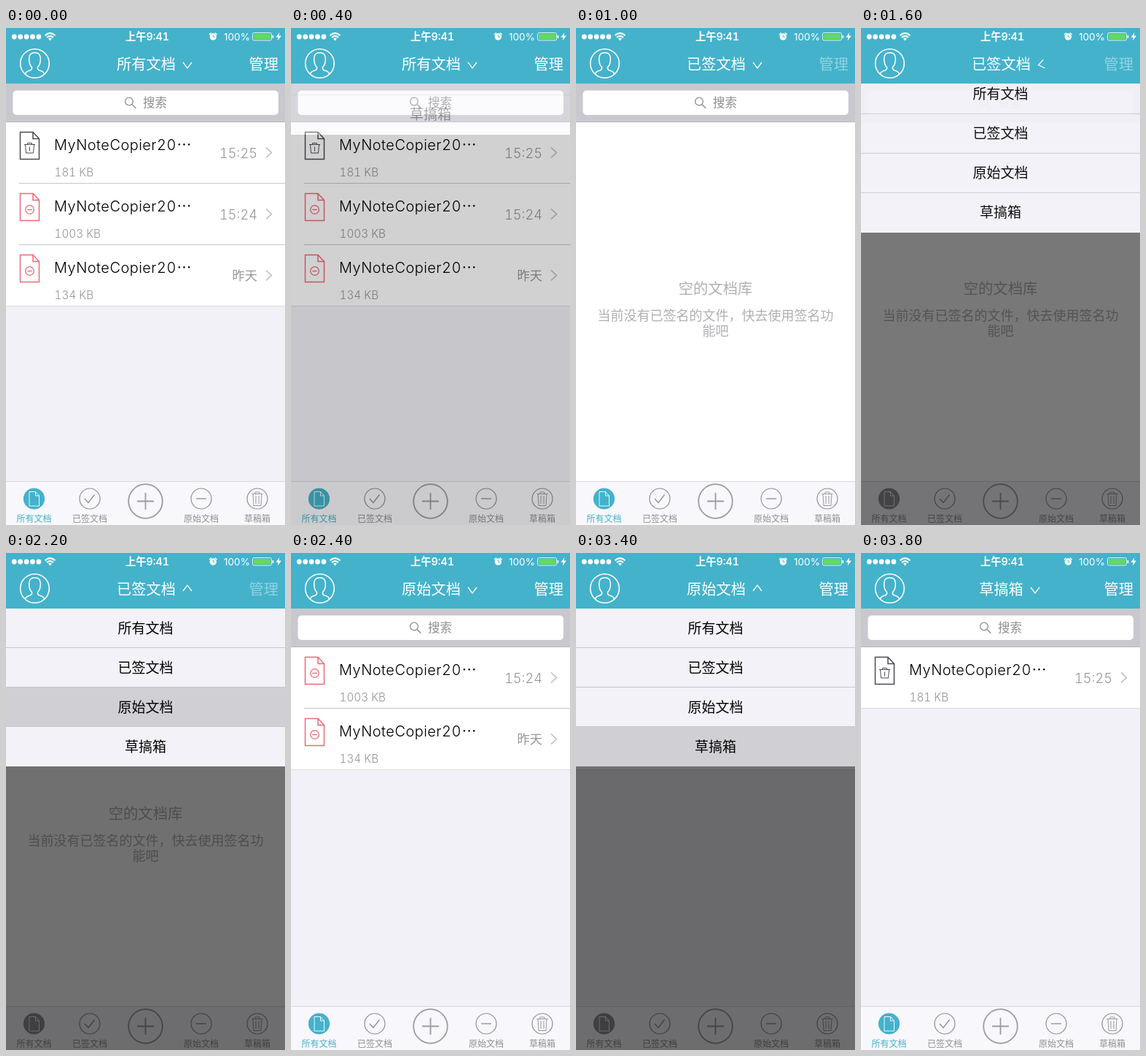
Animation of 383 by 680 pixels, one loop 4000 ms. Source, as an HTML page:

```html
<!DOCTYPE html>
<html lang="zh-CN">
<head>
<meta charset="utf-8">
<style>
html, body { margin: 0; width: 100%; height: 100%; overflow: hidden; background: #f2f1f7; }
svg { display: block; width: 383px; height: 680px; }
text { font-family: Inter, "Noto Sans CJK SC", "Noto Sans CJK JP", sans-serif; font-variant-numeric: tabular-nums; }
</style>
</head>
<body>
<svg id="stage" viewBox="0 0 383 680"></svg>
<script>
const BLUE = '#44b2cb', GRAY = '#8f8f94', LINE = '#c8c7cc', RED = '#ed6a76', DARK = '#4b4b52';
const LIGHT = 'font-weight="300"';
const TITLES = ['所有文档', '已签文档', '原始文档', '草搞箱'];
const FILES = [
  { size: '181 KB', time: '15:25', draft: true },
  { size: '1003 KB', time: '15:24' },
  { size: '134 KB', time: '昨天' }
];
const VIEWS = [FILES, [], FILES.slice(1), FILES.slice(0, 1)];
const BAR = 76, ROW = 54, MENU = 4 * ROW, LOOP = 4000;

// start, view, menu openness, arrow turn, picked menu row
const STEPS = [
  [0, 0, 0, 0], [400, 0, .324, 0], [600, 0, 1, 180],
  [1000, 1, 0, 0], [1600, 1, .944, 80], [1800, 1, 1, 180], [2200, 1, 1, 180, 2],
  [2400, 2, 0, 0], [2800, 2, .95, 80], [3000, 2, 1, 180], [3200, 2, 1, 180, 3],
  [3600, 3, 0, 0]
];

const rect = (x, y, w, h, fill, more = '') =>
  `<rect x="${x}" y="${y}" width="${w}" height="${h}" fill="${fill}" ${more}/>`;
const path = (d, color, width = 1.2, more = '') =>
  `<path d="${d}" fill="none" stroke="${color}" stroke-width="${width}" ${more}/>`;
const circle = (x, y, r, color, width = 1.2, fill = 'none') =>
  `<circle cx="${x}" cy="${y}" r="${r}" stroke="${color}" stroke-width="${width}" fill="${fill}"/>`;
const at = (x, y, body, more = '') => `<g transform="translate(${x} ${y}) ${more}">${body}</g>`;
// y is the vertical middle of the glyphs
const text = (x, y, size, color, str, anchor = 'middle', more = '') =>
  `<text x="${x}" y="${y + size * .37}" font-size="${size}" fill="${color}" text-anchor="${anchor}" ${more}>${str}</text>`;

function statusBar() {
  let dots = '';
  for (let i = 0; i < 5; i++) dots += circle(11.3 + i * 8.4, 12, 3.4, 'none', 0, '#fff');
  return dots +
    path('M53.5 10.2Q60.5 4 67.5 10.2M56 13Q60.5 9 65 13', '#fff', 2) +
    '<path d="M58 14.6Q60.5 12.6 63 14.6L60.5 17.4Z" fill="#fff"/>' +
    text(194, 12, 14.3, '#fff', '上午9:41', 'middle', 'font-weight="600"') +
    circle(284.3, 12, 4.7, 'none', 0, '#fff') + path('M284.3 9V12.3H286.8', BLUE, .9) +
    path('M279 9.2L281.8 6.5M289.6 9.2L286.8 6.5', '#fff', 1.3) +
    text(335, 12, 13.6, '#fff', '100%', 'end', 'style="font-variant-numeric:normal"') +
    rect(338.5, 6.5, 26, 10.5, 'none', 'rx="2" stroke="#fff" stroke-width=".8"') +
    rect(340, 8, 23, 7.5, '#62d95f', 'rx="1"') + rect(365.6, 10, 1.6, 4, '#fff') +
    '<path d="M375.5 6L370.5 12.8H373.8L372.8 17.5L378 10.6H374.6Z" fill="#fff"/>';
}

function header(view, turn) {
  const title = TITLES[view];
  return rect(0, 0, 383, BAR, BLUE) + statusBar() +
    circle(39.5, 48.5, 19.8, '#fff', 1.6) +
    path('M26.5 63Q27 59.5 33 58Q36 57 35.5 53.5C31.5 50 31.5 45 31.7 41C32 36 35 33.8 39.5 33.8' +
      'S47 36 47.3 41C47.5 45 47.5 50 43.5 53.5Q43 57 46 58Q52 59.5 52.5 63', '#fff', 1.5) +
    text(192.5, 50, 20.2, '#fff', title) +
    at(192.5 + title.length * 10 + 16.5, 49.5, path('M-6 -2.5L0 5.5L6 -2.5', '#fff', 1.3), `rotate(${turn})`) +
    text(374, 50, 20.2, '#fff', '管理', 'end', `opacity="${VIEWS[view].length ? 1 : .42}"`);
}

function searchBar() {
  return rect(0, BAR, 383, 53, '#c9c8ce') + rect(0, 128, 383, 1, '#b6b5bb') +
    rect(9.5, 85.5, 364.5, 33.5, '#fff', 'rx="5"') +
    circle(169, 100.5, 5.4, GRAY, 1.3) + path('M173 104.5L178.3 109.8', GRAY, 1.5) +
    text(188, 102, 16.5, GRAY, '搜索', 'start');
}

function fileRow(file, i, all) {
  const color = file.draft ? DARK : RED, last = i === all.length - 1;
  const mark = file.draft
    ? path('M-7.5 -5H7.5M-3 -5V-7H3V-5M-6 -5L-5 6.5H5L6 -5M0 -2V4', color, 1)
    : circle(0, 0, 5.8, color, 1.3) + path('M-3.2 0H3.2', color, 1.4);
  return at(0, 129 + i * 84,
    rect(0, 0, 383, 84, '#fff') +
    path('M19.5 13.5H37L45.5 22.5V50.5H19.5ZM37 13.5V22.5H45.5', color, 1.5) +
    at(32.5, 35.5, mark) +
    text(66, 30.5, 20, '#000', 'MyNoteCopier20', 'start', LIGHT + ' letter-spacing=".45"') +
    text(234.5, 30.5, 20, '#000', '…', 'start', `style="font-family:'Noto Sans CJK SC','Noto Sans CJK JP',sans-serif"`) +
    text(66.5, 68, 15.3, '#96969b', file.size, 'start', LIGHT) +
    text(345, 42, file.time.length > 2 ? 18.2 : 17.2, '#96969b', file.time, 'end', LIGHT) +
    path('M357 34.5L364.5 41.5L357 48.5', '#bdbdc2', 1.6) +
    rect(last ? 0 : 18, 83, 383, 1, last ? '#dddce1' : LINE));
}

function emptyView() {
  const c = '#b0b0b6';
  return rect(0, 129, 383, 492, '#fff') +
    text(191.5, 356.5, 20.3, c, '空的文档库', 'middle', 'font-weight="500"') +
    text(191.5, 393.5, 18, c, '当前没有已签名的文件，快去使用签名功') +
    text(191.5, 414.5, 18, c, '能吧');
}

function tabBar(tint) {
  const tab = (x, label, icon, color = GRAY, fill = 'none') =>
    at(x, 644, circle(0, 0, 14, color, 1.2, fill) + icon) +
    text(x, 671.5, 12, color, label);
  return rect(0, 620, 383, 60, '#f8f7fb') + rect(0, 620, 383, 1, '#d8d7dc') +
    tab(38.5, '所有文档', path('M-6.5 -9.5H2L7 -4V10H-6.5ZM2 -9.5V-4H7', '#fff', .9), tint, tint) +
    tab(115, '已签文档', path('M-7 0L-2 5.5L6.5 -5.5', GRAY, 1.3)) +
    circle(191.5, 647.5, 23.3, '#9c9ca1', 1.8) + path('M180 647.5H203M191.5 636V659', '#9c9ca1', 1.8) +
    tab(268, '原始文档', path('M-7 0H7', GRAY, 1.3)) +
    tab(345, '草稿箱', path('M-7.5 -6.5H7.5M-3 -6.5V-9H3V-6.5M-6 -6.5L-5 9.5H5L6 -6.5M-2 -4V7M2 -4V7', GRAY, .9));
}

function menu(open, picked) {
  const top = BAR - MENU * (1 - open), bottom = top + MENU;
  const rows = TITLES.map((title, i) => {
    const y = i * ROW;
    return rect(0, y, 383, ROW, i === picked ? '#d0cfd4' : '#f3f2f8') +
      (i < 3 ? rect(0, y + ROW - 1, 383, 1, LINE) : '') +
      text(191.5, y + 26.5, 19, '#000', title);
  }).join('');
  return rect(0, bottom, 383, 680 - bottom, '#000', `opacity="${.56 * open}"`) +
    `<g opacity="${open}">${at(0, top, rows)}</g>`;
}

function draw([, view, open, turn, picked]) {
  const files = VIEWS[view];
  // the active tab loses its tint behind the open menu
  const tint = open > .5 ? GRAY : BLUE;
  stage.innerHTML = rect(0, 0, 383, 680, '#f2f1f7') + searchBar() +
    (files.length ? files.map(fileRow).join('') : emptyView()) +
    tabBar(tint) + (open ? menu(open, picked) : '') + header(view, turn);
}

const stage = document.getElementById('stage');
const begin = performance.now();
let shown;
function tick() {
  const t = (performance.now() - begin) % LOOP;
  const step = STEPS.findLast(s => s[0] <= t);
  if (step !== shown) draw(shown = step);
  requestAnimationFrame(tick);
}
tick();
</script>
</body>
</html>
```
